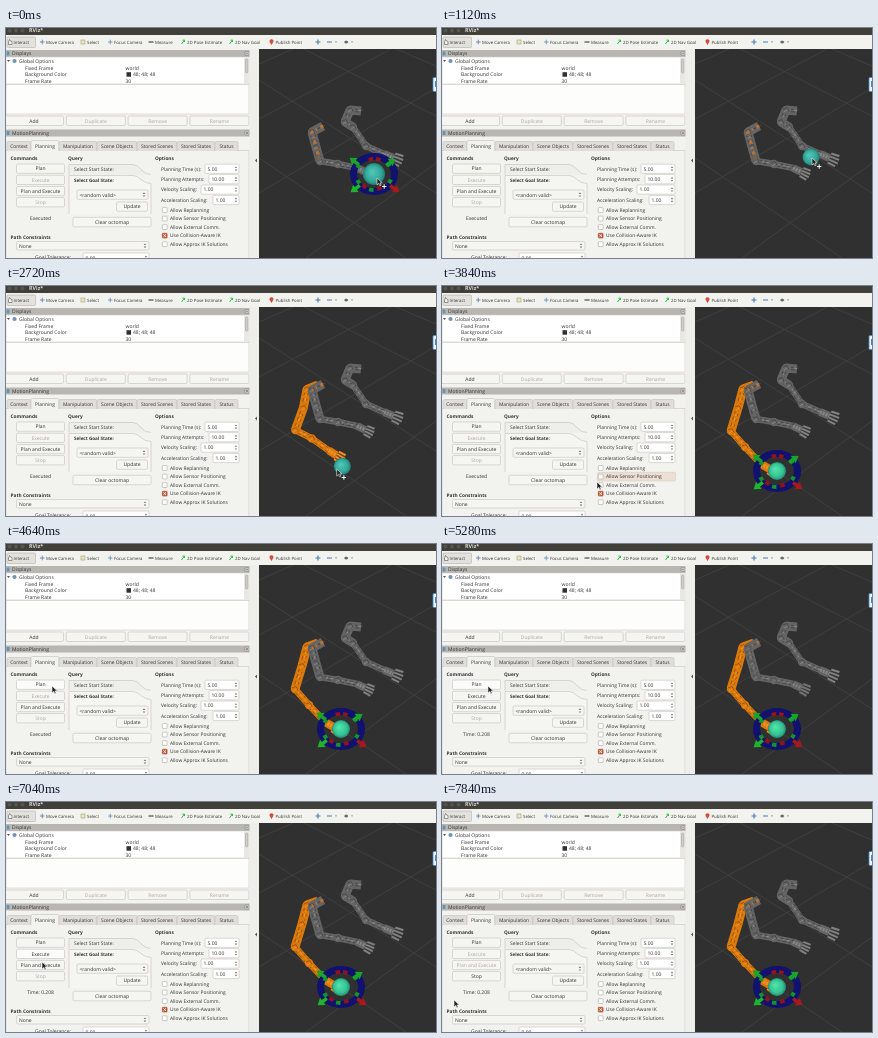
These frames come from a looping animation (430x230 px, 8000 ms). An HTML page with a canvas:

```html
<!DOCTYPE html>
<html lang="en">
<head>
<meta charset="utf-8">
<title>Motion planning</title>
<style>
html, body { margin: 0; width: 100%; height: 100%; overflow: hidden; background: #f1f1ed; }
svg, canvas { position: absolute; left: 0; top: 0; width: 430px; height: 230px; }
text { font-family: "Open Sans", "Noto Sans", sans-serif; font-size: 5px; fill: #333; text-rendering: geometricPrecision; }
</style>
</head>
<body>
<svg id="ui" viewBox="0 0 430 230"></svg>
<canvas id="view"></canvas>
<svg id="top" viewBox="0 0 430 230"></svg>
<script>
const LOOP = 8000, STEP = 160;
const INK = '#333', DIM = '#aaa8a3', EDGE = '#c3c1bb', PANEL = '#f2f2ee', BUTTON = '#f5f5f2';

// ---------- static interface ----------
const out = [];
const rect = (x, y, w, h, fill, stroke = 'none', r = 0, extra = '') =>
  out.push(`<rect x="${x}" y="${y}" width="${w}" height="${h}" rx="${r}" fill="${fill}" stroke="${stroke}" stroke-width=".6" ${extra}/>`);
const path = (d, fill, stroke = 'none', w = .6) =>
  out.push(`<path d="${d}" fill="${fill}" stroke="${stroke}" stroke-width="${w}"/>`);
const text = (x, y, s, { size = 5, fill = INK, bold, mid, id } = {}) =>
  out.push(`<text x="${x}" y="${y + size * .36}" style="font-size:${size}px;fill:${fill}${bold ? ';font-weight:700' : ''}"` +
    `${mid ? ' text-anchor="middle"' : ''}${id ? ` id="${id}"` : ''}>${s.replace(/</g, '&lt;')}</text>`);
const button = (x, y, w, h, label, { fill = INK, id = '' } = {}) => {
  rect(x, y, w, h, BUTTON, EDGE, 1.3, id && `id="${id}Box"`);
  text(x + w / 2, y + h / 2, label, { fill, mid: true, id });
};
const arrows = (x, y) => path(`M${x - 1.3} ${y - .8}l1.3-1.6 1.3 1.6zm0 1.6l1.3 1.6 1.3-1.6z`, '#777');
const field = (x, y, w, h, value) => {
  rect(x, y, w, h, '#fff', EDGE, 1);
  text(x + 2.5, y + h / 2, value);
  arrows(x + w - 3, y + h / 2);
};
const header = (y, title) => {
  rect(0, y, 244, 7, '#b7b6b1');
  rect(.8, y + 1.5, 2.6, 4, '#5b93ba', 'none', .5);
  text(6, y + 3.5, title);
  rect(239, y + 1.5, 4, 4, '#d8d6d1', '#88857f', .5);
  path(`M240 ${y + 2.5}l2 2m0-2l-2 2`, 'none', '#555', .5);
};

function buildInterface() {
  rect(0, 0, 430, 230, PANEL);
  rect(0, 0, 430, 7, '#403f3a');
  for (let i = 0; i < 3; i++) out.push(`<circle cx="${3.5 + i * 6.5}" cy="2.5" r="2" fill="#56544e"/>`);
  text(23, 2.4, 'RViz*', { size: 5.4, fill: '#dfdbd2', bold: true });

  rect(0, 7, 430, 14, '#f2f2ef');
  rect(1, 9, 28.5, 10.5, '#e2e1dc', '#b3b1ab', 1);
  const tools = [[7.5, 'Interact', '#555'], [40, 'Move Camera', '#6484b0'], [81, 'Select', '#a9a268'],
    [108, 'Focus Camera', '#6f93b9'], [149, 'Measure', '#8d8d86'], [181, '2D Pose Estimate', '#2fc23c'],
    [229, '2D Nav Goal', '#2fc23c'], [269.5, 'Publish Point', '#d54b38']];
  for (const [x, label, color] of tools) {
    text(x, 14, label, { size: 4.35 });
    if (label === 'Measure') rect(x - 6.5, 13, 5, 2, color);
    else if (label === 'Publish Point') path(`M${x - 4} 17l-1.8-3a2 2 0 1 1 3.6 0z`, color);
    else if (label === 'Select') rect(x - 6, 12, 4, 4, '#e8e4c8', color);
    else if (label === 'Interact') path(`M${x - 5} 16.5v-2.5l1-2.5 1 1.5 1.5.5v3z`, '#f5f5f2', color);
    else if (label.startsWith('2D')) path(`M${x - 5.5} 16l3-4m-2 .2l2-.2 0 2`, 'none', color, 1);
    else path(`M${x - 6} 14h4.5m-2.25-2.3v4.6`, 'none', color, .9);
  }
  path('M309.5 14h5m-2.5-2.5v5M321 14h5', 'none', '#497db5', 1.2);
  path('M338 14q2.2-3 4.4 0q-2.2 3-4.4 0z', '#666b70');
  path('M329 13.5l1 1.3 1-1.3zM345 13.5l1 1.3 1-1.3z', '#666');

  header(22, 'Displays');
  rect(0, 29, 243, 27, '#fff', '#cccac5');
  path('M1 32h3l-1.5 2z', '#555');
  out.push('<circle cx="8.5" cy="33" r="2.1" fill="#6f94b5"/>');
  ['Global Options', 'Fixed Frame', 'Background Color', 'Frame Rate']
    .forEach((s, i) => text(i ? 19 : 13, 33 + i * 6.75, s));
  text(119.5, 39.7, 'world');
  rect(120.5, 44.2, 4.5, 4.5, '#303030');
  text(127, 46.5, '48; 48; 48');
  text(119.5, 53.2, '30');
  rect(238, 29.3, 4.7, 26.4, '#e8e7e3');
  rect(239.5, 31, 2.4, 14, '#cfccc7', '#aaa8a2', 1.1);
  rect(0, 56.5, 243, 29.5, '#fdfdfc', '#cccac5');
  ['Add', 'Duplicate', 'Remove', 'Rename'].forEach((s, i) =>
    button(61.8 * i - 1.5, 88, 59, 9.5, s, { fill: i ? DIM : INK }));

  header(101.5, 'MotionPlanning');
  rect(0, 122.5, 243, 110, PANEL, '#c9c7c2');
  const tabs = [[1, 24, 'Context'], [25, 28, 'Planning'], [53, 38, 'Manipulation'], [91, 40, 'Scene Objects'],
    [131, 40, 'Stored Scenes'], [171, 38, 'Stored States'], [209, 23, 'Status']];
  for (const [x, w, label] of tabs) {
    const on = label === 'Planning';
    path(`M${x} 123v-${on ? 9 : 8}q0-1.5 1.5-1.5h${w - 3}q1.5 0 1.5 1.5v${on ? 9 : 8}`, on ? PANEL : '#dfded9', EDGE);
    text(x + w / 2, 118, label, { mid: true, size: 4.9 });
  }
  [[4.5, 'Commands'], [62, 'Query'], [149, 'Options']].forEach(([x, s]) => text(x, 130.5, s, { bold: true, size: 4.8 }));

  [['plan', 'Plan'], ['exec', 'Execute'], ['both', 'Plan and Execute'], ['stop', 'Stop']].forEach(([id, s], i) =>
    button(10.5, 136 + i * 11.2, 48, 9.3, s, { id }));
  text(34.5, 190, '', { mid: true, id: 'status' });
  text(4.5, 209.5, 'Path Constraints', { bold: true, size: 4.8 });
  rect(10.5, 213.5, 132.5, 8.5, BUTTON, EDGE, 1.2);
  text(13, 217.7, 'None');
  arrows(139, 217.8);
  text(29, 229, 'Goal Tolerance:');
  field(77, 225, 66, 10, '0.00');

  rect(63, 156, 82, 30, '#f5f5f2');
  path('M63 146.5v-10h64q4 0 8 5t10 5', '#eeeeea', EDGE);
  path('M63 186v-38.5h64q4 0 8 4t10 4V186', '#f5f5f2', EDGE);
  text(68, 141, 'Select Start State:', { size: 4.9 });
  text(68, 152, 'Select Goal State:', { bold: true, size: 4.6 });
  rect(71, 162, 71, 9.3, BUTTON, EDGE, 1.2);
  text(73.5, 166.7, '<random valid>');
  arrows(138, 166.7);
  button(110.5, 174, 31, 9.3, 'Update');
  button(67, 189.3, 78, 9.5, 'Clear octomap');

  [[199, 'Planning Time (s):', '5.00'], [203, 'Planning Attempts:', '10.00'],
    [195, 'Velocity Scaling:', '1.00'], [207, 'Acceleration Scaling:', '1.00']].forEach(([x, s, v], i) => {
    const y = 140.8 + i * 10.4;
    text(155, y, s, { size: 4.9 });
    field(x, y - 4.6, 233 - x, 9.2, v);
  });
  rect(155.5, 186.3, 78, 8.6, '#ecdfd4', '#dcc9ba', 1, 'id="hover"');
  ['Allow Replanning', 'Allow Sensor Positioning', 'Allow External Comm.', 'Use Collision-Aware IK', 'Allow Approx IK Solutions']
    .forEach((s, i) => {
      const y = 182 + i * 8.55, on = i === 3;
      rect(156.3, y - 2.4, 4.8, 4.8, on ? '#c75f3d' : '#fff', on ? '#9c4529' : '#aaa8a0', .7);
      if (on) path(`M157.4 ${y - 1.3}l2.6 2.6m0-2.6l-2.6 2.6`, 'none', '#fff', .8);
      text(164, y, s, { size: 4.9 });
    });
  rect(243.5, 21, 9.5, 209, '#eeeeea');
  path('M251 130.5v4l-2-2z', '#555');
  document.getElementById('ui').innerHTML = out.join('');
}
buildInterface();

document.getElementById('top').innerHTML =
  `<rect x="427" y="49.5" width="6" height="14" rx="1" fill="#f2f2ef" stroke="#3d88d0" stroke-width=".8"/>
   <path d="M429 53h1v6h-1z" fill="#3d88d0"/>
   <g id="cursor"><path d="M0 0v7l1.8-1.6 1.1 2.4 1.2-.5-1.1-2.4h2.3z" fill="#222" stroke="#eee" stroke-width=".6"/>
   <path id="moveSign" d="M5 8.5h4.4M7.2 6.3v4.4" stroke="#fff" stroke-width="1"/></g>`;

// ---------- motion ----------
const START = [[317, 98], [306, 104], [310, 119], [314, 133], [332, 136], [351, 140], [368, 148]];
const REACH = [[312, 99], [301, 104], [300, 122], [290, 142], [311, 135], [330, 137], [343, 147]];
const GOAL = [[312, 99], [301, 103], [296, 122], [289, 145], [303, 161], [319, 178], [336, 188]];
const REST = [[355, 83], [344, 82], [339, 94], [347, 99], [360, 118], [378, 126], [397, 134]];

const poseKeys = [[1440, START], [2080, REACH], [3040, GOAL]];
const ghostKeys = [[5280, START], [5760, REACH], [6240, GOAL]];
const ballKeys = [[480, [368, 146]], [1120, [369, 129]], [1440, [369, 130]], [2080, [342, 145]],
  [2560, [337, 178]], [3040, [335, 185]]];
const cursorKeys = [[480, [371, 150]], [1120, [370, 130]], [1440, [368, 133]], [2080, [333, 157]], [2560, [330, 181]],
  [3040, [332, 187]], [3360, [332, 187]], [3840, [155, 196]], [4160, [93, 171]], [4480, [46, 142]],
  [5440, [46, 142]], [6080, [36, 156]], [6880, [36, 156]], [7040, [36, 160]], [7360, [36, 160]], [7840, [12, 198]]];

const mix = (a, b, k) => Array.isArray(a) ? a.map((v, i) => mix(v, b[i], k)) : a + (b - a) * k;
function at(keys, t) {
  const i = keys.findIndex(([time]) => time > t);
  if (i === 0) return keys[0][1];
  if (i < 0) return keys[keys.length - 1][1];
  const [t0, a] = keys[i - 1], [t1, b] = keys[i];
  return mix(a, b, (t - t0) / (t1 - t0));
}

// ---------- 3D view ----------
const canvas = document.getElementById('view');
const ratio = window.devicePixelRatio || 1;
canvas.width = 430 * ratio;
canvas.height = 230 * ratio;
const ctx = canvas.getContext('2d');
ctx.scale(ratio, ratio);

function line(points, color, width, dash = []) {
  ctx.beginPath();
  points.forEach(([x, y]) => ctx.lineTo(x, y));
  ctx.setLineDash(dash);
  ctx.strokeStyle = color;
  ctx.lineWidth = width;
  ctx.stroke();
  ctx.setLineDash([]);
}
function disc(x, y, r, color) {
  ctx.beginPath();
  ctx.arc(x, y, r, 0, 7);
  ctx.fillStyle = color;
  ctx.fill();
}
const GRAY = ['#474747', '#646464', '#858585'];
const ORANGE = ['#9c5207', '#db7a0c', '#f0932a'];

// Six joints followed by the fingertip.
function arm(joints, [dark, mid, light], alpha = 1) {
  ctx.globalAlpha = alpha;
  ctx.lineJoin = 'bevel';
  const links = joints.slice(0, 6), wrist = links[5], tip = joints[6];
  const shift = (dx, dy) => links.map(([x, y]) => [x + dx, y + dy]);
  line(links.slice(0, 4), mid, 9);
  line(links.slice(3), mid, 6.6);
  line(shift(-2, 1), dark, 1, [4, 2.5]);
  line(shift(2, -1), dark, 1, [2.5, 3]);
  line(shift(.2, -.3), light, 1.3, [3, 4, 1.5, 2]);
  for (const [x, y] of links.slice(1, 5)) {
    disc(x, y, 4.2, mid);
    line([[x - 3, y - 1], [x + 1, y - 2.5], [x + 3, y + 1.5]], dark, .9);
    line([[x - 2, y + 2], [x + 1.5, y]], light, 1);
  }
  const palm = mix(wrist, tip, .5), dx = (tip[0] - wrist[0]) / 18, dy = (tip[1] - wrist[1]) / 18;
  line([wrist, palm], mid, 8);
  line([wrist, palm], light, 3.5, [2, 1]);
  for (const k of [-4.2, -1.4, 1.4, 4.2]) {
    const base = [palm[0] - dy * k, palm[1] + dx * k];
    const end = [tip[0] - dy * k * 1.15 - dx * Math.abs(k) * .4, tip[1] + dx * k * 1.15 - dy * Math.abs(k) * .4];
    line([base, end], dark, 2.7);
    line([base, end], light, 1.7);
  }
  ctx.globalAlpha = 1;
}
function ball([x, y], r, bright) {
  const shade = ctx.createRadialGradient(x - 2, y - 2, 1, x, y, r);
  shade.addColorStop(0, bright ? '#4ee3a8' : '#50c4b4');
  shade.addColorStop(.7, bright ? '#35c294' : '#32a69a');
  shade.addColorStop(1, bright ? '#248a72' : '#217c72');
  disc(x, y, r, shade);
}
function ring(rx, ry, color, width, from = 0, to = 7) {
  ctx.beginPath();
  ctx.ellipse(0, 0, rx, ry, 0, from, Math.min(to, from + Math.PI * 2));
  ctx.strokeStyle = color;
  ctx.lineWidth = width;
  ctx.stroke();
}
function cone(x, y, angle, color) {
  ctx.save();
  ctx.translate(x, y);
  ctx.rotate(angle);
  ctx.fillStyle = color;
  ctx.beginPath();
  [[5.5, 0], [-1, -4.5], [-1, -1.8], [-6, -1.8], [-6, 1.8], [-1, 1.8], [-1, 4.5]].forEach(p => ctx.lineTo(...p));
  ctx.fill();
  ctx.restore();
}
function marker([x, y]) {
  const red = '#8f141b', green = '#12952a';
  ctx.save();
  ctx.translate(x, y);
  ring(20.5, 17.5, '#11116f', 7);
  for (const a of [-1.9, -1.45, 1.1, 2.05]) ring(16.5, 15, red, 4, a, a + .28);
  for (const a of [-2.75, -.75, .35, 1.6, 2.5]) ring(18, 16, green, 4, a, a + .25);
  cone(-20, -13, -2.5, '#18a52a');
  cone(-19, 15, 2.5, '#1cb52c');
  cone(17, -12, -.6, '#18a52a');
  cone(21, 15, .6, '#a8181f');
  ctx.restore();
}
const grid = [[253, 36, 287, 21], [253, 91, 385, 21], [253, 165, 430, 60], [300, 230, 430, 135],
  [253, 52, 430, 165], [298, 21, 430, 88], [253, 130, 400, 230], [390, 21, 430, 38]];

function drawView(t) {
  ctx.clearRect(0, 0, 430, 230);
  ctx.save();
  ctx.beginPath();
  ctx.rect(253, 21, 177, 209);
  ctx.clip();
  ctx.fillStyle = '#303030';
  ctx.fillRect(253, 21, 177, 209);
  grid.forEach(([a, b, c, d]) => line([[a, b], [c, d]], '#454545', .7));
  arm(REST, GRAY);
  if (t >= 1600) arm(at(poseKeys, t), ORANGE);
  arm(START, GRAY);
  line(START.slice(0, t < 1600 ? 4 : 2), 'rgba(215,115,30,.65)', 4, [3, 4, 1, 3]);
  if (t >= 5280 && t < 6720) arm(at(ghostKeys, t), GRAY, .4);
  const center = at(ballKeys, t), placed = t >= 3520;
  if (t < 480 || placed) marker(center);
  ball(center, t < 480 ? 11 : placed ? 9 : 8.5, placed);
  ctx.restore();
}

const el = id => document.getElementById(id);
const enable = (id, on) => { el(id).style.fill = on ? INK : DIM; };
const glow = (id, on) => el(id + 'Box').setAttribute('fill', on ? '#fbfbfa' : BUTTON);

function render(now) {
  const t = Math.floor((now % LOOP) / STEP) * STEP;
  drawView(t);
  const planned = t >= 4960, running = t >= 7520;
  enable('exec', planned && !running);
  enable('both', !running);
  enable('stop', running);
  el('status').textContent = planned ? 'Time: 0.208' : 'Executed';
  glow('plan', t >= 4480 && t < 5760);
  glow('exec', t >= 5920 && t < 7520);
  el('hover').style.display = t === 3840 ? '' : 'none';
  const [x, y] = at(cursorKeys, t);
  el('cursor').setAttribute('transform', `translate(${x} ${y})`);
  el('moveSign').style.display = x > 253 ? '' : 'none';
}
const begin = performance.now();
function tick() {
  render(performance.now() - begin);
  requestAnimationFrame(tick);
}
tick();
</script>
</body>
</html>
```
